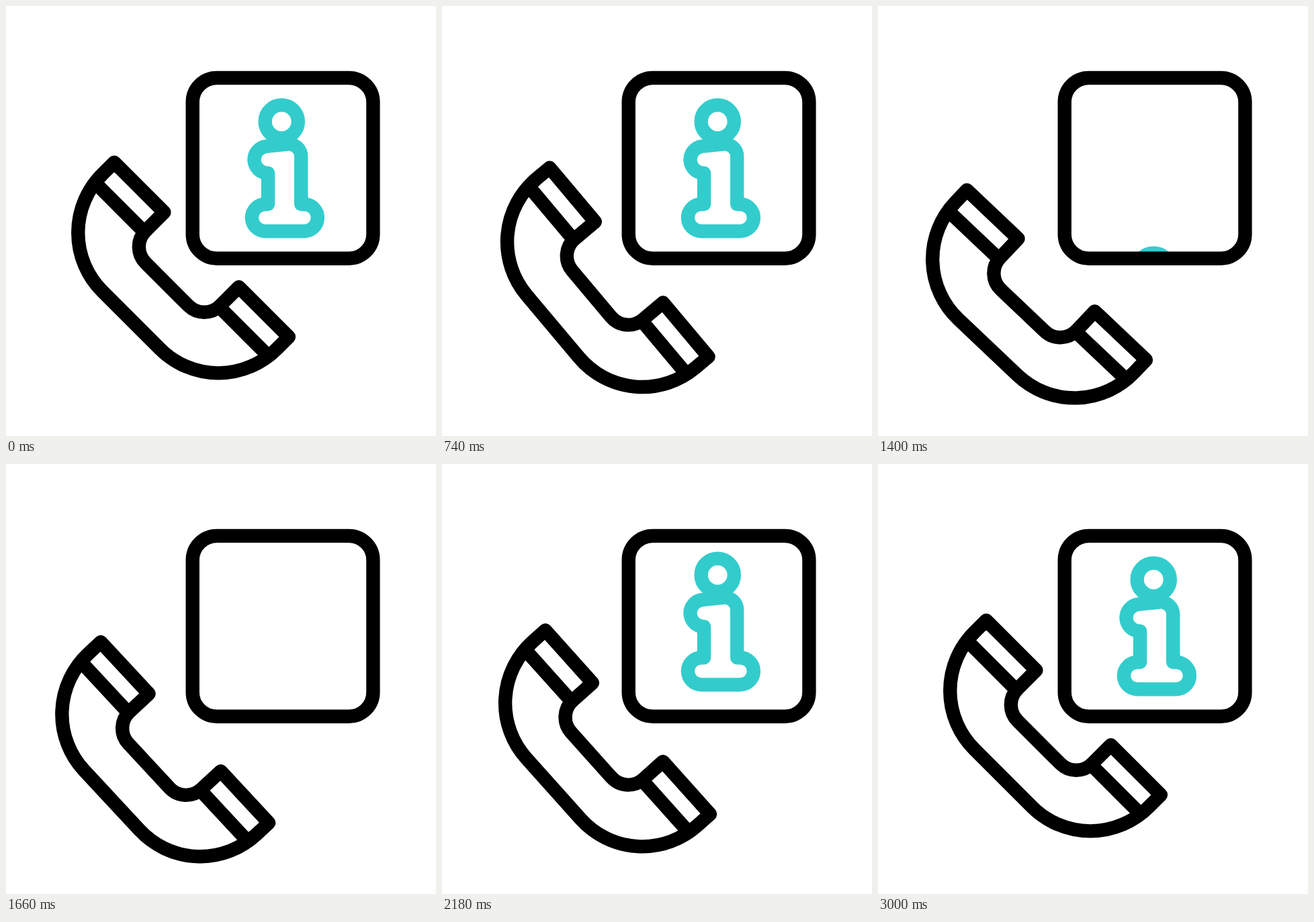
An HTML page for the animation above (3020 ms loop, 640 px wide and 640 px high).

```html
<!DOCTYPE html>
<html lang="en">
<head>
<meta charset="utf-8">
<title>Phone information</title>
<style>
  html, body { margin: 0; height: 100%; overflow: hidden; background: #fff; }
  svg { display: block; width: 100vw; height: 100vh; }
  g { fill: none; stroke: #000; stroke-width: 20.4; stroke-linejoin: round; stroke-linecap: round; }
  #info { stroke: #33cccc; }
</style>
</head>
<body>
<svg viewBox="0 0 640 640">
  <clipPath id="panel"><rect x="267.5" y="96.8" width="289.1" height="289.1" rx="46.2"/></clipPath>
  <g clip-path="url(#panel)">
    <g id="info">
      <circle cx="410.2" cy="172" r="24.6"/>
      <path d="M390 295V248.8H389A20.1 20.1 0 0 1 386.8 208.8L418.6 205.5A18.6 18.6 0 0 1 439.2 224V295H443.8A20 20 0 0 1 443.8 335.2H386A20 20 0 0 1 386 295Z"/>
    </g>
  </g>
  <g><rect x="277.7" y="107" width="268.7" height="268.7" rx="36"/></g>
  <!-- the handset lies along the x axis, centred on its pivot -->
  <g id="phone">
    <path d="M-183.7 0H-78.6V39.2A33.6 33.6 0 0 0 -45 72.8H45A33.6 33.6 0 0 0 78.6 39.2V0H183.7V25.2A123 123 0 0 1 60.7 148.2H-60.7A123 123 0 0 1 -183.7 25.2ZM-182.6 41.6H-78.6M78.6 41.6H182.6"/>
  </g>
</svg>
<script>
  const LOOP = 3020, END = 3000, HALF = END / 2, SWING = 250;
  const phone = document.getElementById('phone');
  const info = document.getElementById('info');

  const clamp = x => Math.min(1, Math.max(0, x));
  const ease = x => { x = clamp(x); return x * x * (3 - 2 * x); };

  // swings between +5 and -5 degrees, at rest at both ends
  const tilt = i => i % (END / SWING) ? (i % 2 ? 5 : -5) : 0;

  function angle(t) {
    const i = Math.floor(t / SWING);
    return tilt(i) + (tilt(i + 1) - tilt(i)) * ease(t / SWING - i);
  }

  // sinks out of the panel, then drops in again from above
  function infoShift(t) {
    return t < HALF ? 231.4 * ease((t - 750) / 750) : -284 * (1 - ease((t - HALF) / 750));
  }

  function draw() {
    const t = Math.min(performance.now() % LOOP, END);
    const away = ease(1 - Math.abs(t / HALF - 1));
    const x = 291 - 25.7 * away, y = 362.6 + 38.2 * away;
    phone.setAttribute('transform', `translate(${x} ${y}) rotate(${45 + angle(t)})`);
    info.setAttribute('transform', `translate(0 ${infoShift(t)})`);
    requestAnimationFrame(draw);
  }
  draw();
</script>
</body>
</html>
```
